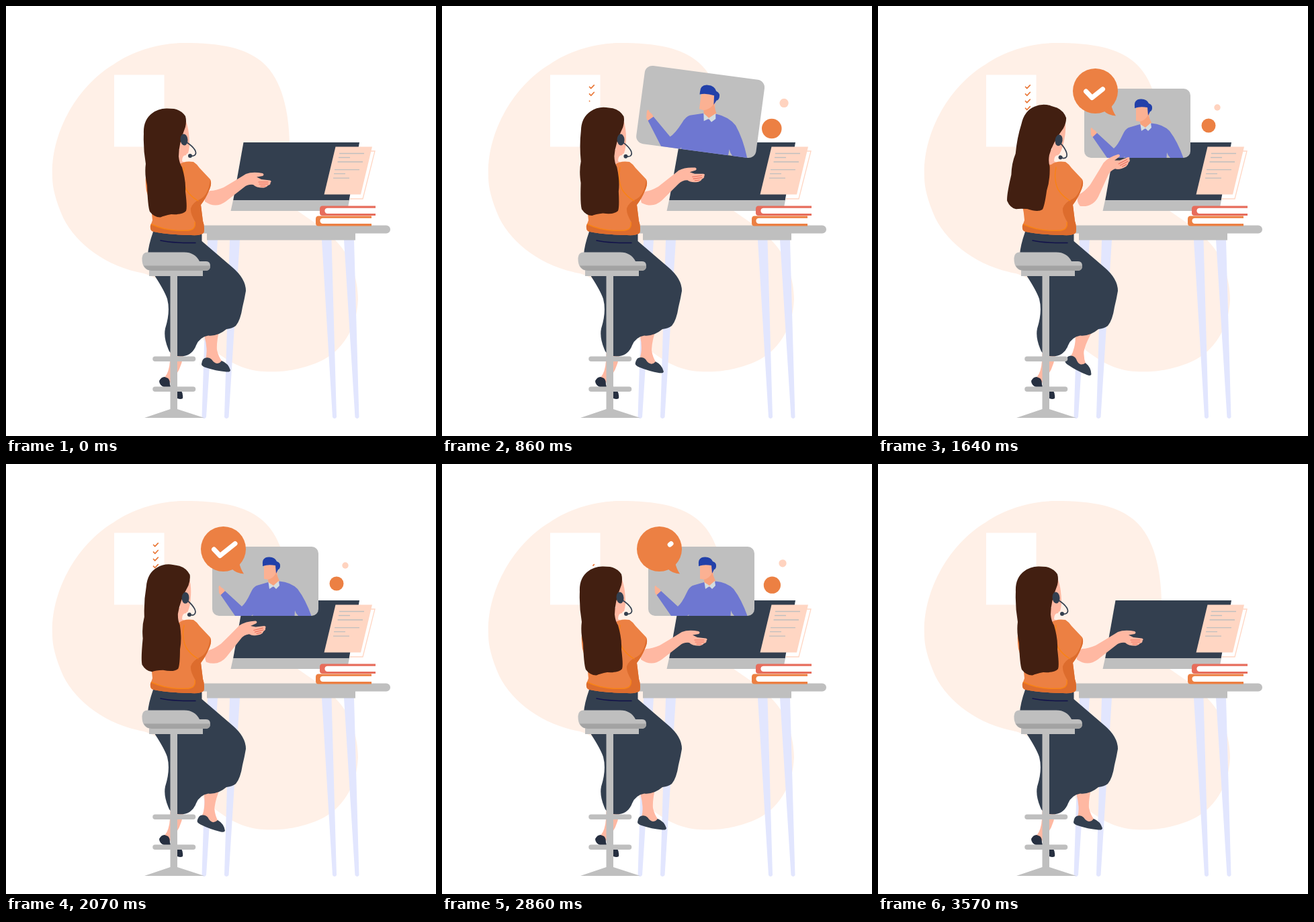
An HTML page that plays this animation: 640x640 px, repeating every 3.64 s.

```html
<!DOCTYPE html>
<html lang="en">
<head>
<meta charset="utf-8">
<title>Video call</title>
<style>
  html, body { margin: 0; width: 100%; height: 100%; overflow: hidden; background: #fff; }
  svg { display: block; width: 100%; height: 100%; }
  .grey { fill: #bfbfbf; }
  .navy { fill: #333f4f; }
  .skin { fill: #ffb8a2; }
  .orange { fill: #ec8043; }
  .line { fill: none; stroke-linecap: round; stroke-linejoin: round; }
</style>
</head>
<body>
<svg viewBox="0 0 640 640">
  <path fill="#fff0e7" d="M69 255C66 190 105 120 160 87C190 66 230 55 265 55C320 55 356 62 382 84C412 110 421 160 422 203C423 240 415 290 434 305C455 320 490 340 508 372C520 395 524 420 524 437C522 480 500 515 465 530C430 545 400 545 385 544C350 543 325 525 300 505C270 470 250 410 205 398C150 388 105 355 85 315C74 290 69 270 69 255Z"/>
  <rect x="161" y="102.5" width="74.5" height="107" fill="#fff"/>
  <g id="ticks" class="line" stroke="#e9793a" stroke-width="1.7"></g>

  <!-- desk -->
  <path fill="#e2e6fe" d="M300 348H315L298 612Q295 616 291.500 612ZM333 348H348L331.500 612Q328 616 325 612ZM470 348H484.500L492 612Q489 616 486 612ZM503 348H518L525.500 612Q523 616 519.500 612Z"/>
  <path class="grey" d="M280 326.500H566A6 6 0 0 1 566 338.500H520V348.500H299V338.500H280Z"/>
  <path class="navy" d="M353.500 203H526L510.500 290H338Z"/>
  <path class="grey" d="M338 289H511L508 305H334.500Z"/>
  <path fill="none" stroke="#ffd6c3" stroke-width="1.300" d="M543 216H549L531 287H511"/>
  <path fill="#ffd6c3" d="M490.500 209.500H545L528 280.500H473.500Z"/>
  <path stroke="#bfbfbf" stroke-width="1.300" d="M496 219.500H533M495 225.500H512M493.500 232H531M489 243.700H526M488 249.700H505M487 256.200H511"/>
  <path fill="#e76d5c" d="M550 297.500H471Q467 297.500 467 302V308Q467 312 471 312H550Z"/>
  <path fill="#fff" d="M551 300.700H478A4.200 4.200 0 0 0 478 309H551Z"/>
  <path class="orange" d="M544 312.500H465Q461 312.500 461 317V323Q461 327.500 465 327.500H544Z"/>
  <path fill="#fff" d="M545 315.700H471A4.200 4.200 0 0 0 471 324H545Z"/>

  <!-- caller's window -->
  <g id="call">
    <rect class="grey" x="307" y="123" width="158" height="103" rx="10"/>
    <path fill="#fbb193" d="M317 192L316.500 183Q318 179 319.500 183L324 186L326.500 190L320 196Z"/>
    <path fill="#6e77d1" d="M319.500 195L326 189L351 212Q357 207 364 192Q368 183 373 181L390 176L397 181L407 174.500Q424 176 434 186Q446 202 454.500 226H435Q431 222 430 218L429.500 226H367L368 224L365 226H341Z"/>
    <path fill="#fbb193" d="M384 150L401 150Q405 160 404 176L399 182L392 178L390 172L384 171Z"/>
    <path fill="#f7a27d" d="M390 172Q398 170 402 162L407 174L398 183L391 178Z"/>
    <path fill="#d3dde0" d="M390.500 176L398 181L406 174L407 181L402 186L398 182L392 186Z"/>
    <path fill="#2240a9" d="M382 149Q381 139 391 138.500Q400 138 403 145Q409 147 408 153Q407 157 405 157L402 163L401 151Q390 149 382 152Z"/>
  </g>
  <g id="bubble">
    <circle class="orange" cx="323.500" cy="126.500" r="33.500"/>
    <path class="orange" d="M347 147Q349 156 354 163.500Q343 163 336 156Z"/>
    <path id="tick" class="line" stroke="#fff" stroke-width="7" pathLength="1" d="M309.500 127L318.500 136.500L341 118.500"/>
  </g>
  <g id="dots">
    <circle class="orange" cx="492" cy="178" r="10.500"/>
    <circle cx="505" cy="151" r="4.700" fill="#ffd3bf"/>
  </g>

  <!-- woman -->
  <g id="leg">
    <path class="skin" d="M294 480H318Q313 500 314 512Q316 522 323 531L311 535L297 525Q301 512 295 490Z"/>
    <path class="navy" d="M291 533Q292 525 296 524Q302 522 306 526Q310 532 315 532Q319 531 321 528Q331 532 334 542Q334 545 328 544.500Q312 543 297 538Q291 536 291 533Z"/>
  </g>
  <path class="skin" d="M245 510H266Q262 537 253 549L246 562L236 553Q243 545 244 528Z"/>
  <path fill="#262f40" d="M228 558Q231 552 236 552L241 554Q244 556 244 564Q250 571 261 573Q264 577 263 584Q260 586 255 584Q249 573 237 568Q228 565 228 558Z"/>
  <path class="navy" d="M219 336H291.500V350L337 389Q357 406 357 424Q355 436 352 448Q349 468 342 476Q337 480 328 481Q315 492 301 490.500Q288 493 283 505Q277 521 260 521.500Q248 521 243 514Q234 494 237 480Q245 455 240 436Q236 424 221 401L211 370Q212 356 219 336Z"/>
  <path class="line" stroke="#12124a" stroke-width="1.500" d="M230 349Q248 353 282 352.500"/>
  <g id="arm">
    <path class="skin" d="M296 291Q294 279 304 275Q312 275 324 270Q341 260 357 250Q367 246 382 249Q385 251 382 253L373 254.500L380 258L393 259.500Q396 261 393.500 263Q394 266 390 267Q388 270 384 270.500Q373 271 368 266Q360 265 354 270L327 291Q312 302 296 291Z"/>
    <path class="line" stroke="#e96f5d" stroke-width="1.100" d="M376 262H390M377 265L390 265M379 268H386"/>
  </g>
  <path class="skin" d="M255 214H271L268 222Q262 222 262 231L271 235L263 242L252 238Z"/>
  <path class="orange" d="M258 236Q265 230 279 232Q284 235 288 241L304 258Q307 264 302 275Q297 287 290 296L293 320Q296 328 294.500 337Q292 342 275 341Q236 340 220 336Q214 335 215 327L218 319Q217 300 209 275Q205 248 214 240Z"/>
  <path fill="#dd6c2d" d="M304 259Q307 264 302 275Q297 287 290 296L293 320Q296 328 294.500 337Q292 342 275 341Q236 340 220 336Q214 335 215 327L216 324Q240 336 270 335Q283 333 282 322Q274 309 275 301Q278 292 290 287Q301 281 304 259Z"/>
  <path class="line" stroke="#f98315" stroke-width="1.400" d="M217 325Q240 336 271 334Q283 333 281 322M265 240Q261 258 268 273Q275 284 286 290"/>
  <g id="head">
    <path class="skin" d="M262 172H268Q272 184 272.500 195Q274 210 271 219Q267 222 260 220L255 200Z"/>
    <path fill="#421f11" d="M205 190Q204 170 217 160Q227 152 240 152.500L250 153Q261 155 267 164Q269 171 267 180Q257 205 257 224Q258 234 262 240Q268 260 267 276Q270 300 268 305Q263 311 246 310Q235 312 230 314.500Q221 315 214 306Q211 298 210 267Q206 250 208 235Q204 212 205 190Z"/>
    <path class="line" stroke="#333f4f" stroke-width="1.700" d="M269 203Q277 208 281 214Q284 219 281 222Q278 224 274 223"/>
    <ellipse class="navy" cx="265" cy="199" rx="5.500" ry="8.500" transform="rotate(-6 265 199)"/>
    <circle class="navy" cx="274" cy="223" r="3"/>
  </g>

  <!-- stool -->
  <path class="grey" d="M244.500 400H255V600L295 613H206L244.500 600Z"/>
  <path class="line" stroke="#bfbfbf" stroke-width="7.500" d="M222 525.300H278.500M222 570.300H278.500"/>
  <path class="grey" d="M213 392H293V402H213ZM210 366.500H264Q281 366 288 380H298Q304 380 304 387Q304 394 297 394H217Q202 393 202.500 375Q203 367 210 366.500Z"/>
  <path fill="#a3a3a3" d="M205 386.500H304Q304 394 297 394H217Q208 393 205 386.500Z"/>
</svg>
<script>
const LOOP = 3640, STEP = 1000 / 14;
const get = id => document.getElementById(id);
const [call, bubble, dots, leg, arm, head, tick, ticks] =
  ['call', 'bubble', 'dots', 'leg', 'arm', 'head', 'tick', 'ticks'].map(get);

for (let i = 0; i < 4; i++) {
  const path = document.createElementNS('http://www.w3.org/2000/svg', 'path');
  path.setAttribute('d', `M219.500 ${120.3 + i * 10.6}l2.200 2.400l4.600 -4.800`);
  path.setAttribute('pathLength', 1);
  ticks.append(path);
}

const progress = (f, start, length) => Math.min(1, Math.max(0, (f - start) / length));
const smooth = x => x * x * (3 - 2 * x);
const backIn = (x, pull) => x * x * ((pull + 1) * x - pull);
const backOut = (x, pull) => 1 - backIn(1 - x, pull);
const rotate = (el, angle, x, y) => el.setAttribute('transform', `rotate(${angle} ${x} ${y})`);

function grow(el, scale, x, y, angle = 0) {
  el.setAttribute('visibility', scale > 0.005 ? 'visible' : 'hidden');
  el.setAttribute('transform',
    `translate(${x} ${y}) rotate(${angle}) scale(${Math.max(scale, 0)}) translate(${-x} ${-y})`);
}

// Shows the part of a stroke between two fractions of its length.
function trim(path, from, to) {
  path.setAttribute('visibility', to - from > 0.001 ? 'visible' : 'hidden');
  path.setAttribute('stroke-dasharray', `${to - from} 3`);
  path.setAttribute('stroke-dashoffset', -from);
}

function draw(time) {
  const f = Math.floor((time % LOOP + 4.5) / STEP);

  const callSize = f < 30 ? backOut(progress(f, 2, 14), 2.77) : 1 - backIn(progress(f, 41.8, 7.6), 2.85);
  grow(call, callSize, 456, 225, (callSize - 1) * (callSize > 1 ? 55 : 85));

  const bubbleSize = smooth(progress(f, 13, 5)) - smooth(progress(f, 42, 5));
  grow(bubble, bubbleSize, 354, 164, (bubbleSize - 1) * 76);

  const dotSize = f < 30 ? backOut(progress(f, 7.97, 11), 4.5) : 1 - backIn(progress(f, 38.2, 7.06), 4.5);
  grow(dots, dotSize, 495, 167);

  trim(tick, smooth(progress(f, 34, 7)), smooth(progress(f, 18, 7)));
  if (bubbleSize < 0.9) tick.setAttribute('visibility', 'hidden');
  [...ticks.children].forEach((path, i) =>
    trim(path, progress(f, 34 + i * 1.6, 1.5), progress(f, 7.95 + i * 2, 2)));

  const sway = smooth(progress(f, 9, 9)) - smooth(progress(f, 24.5, 9));
  rotate(head, 15 * sway, 264, 215);
  rotate(arm, -27.5 * sway, 312, 285);
  rotate(leg, 15.9 * sway, 303, 486);
}

const begin = performance.now();
function tickFrame() {
  draw(performance.now() - begin);
  requestAnimationFrame(tickFrame);
}
tickFrame();
</script>
</body>
</html>
```
